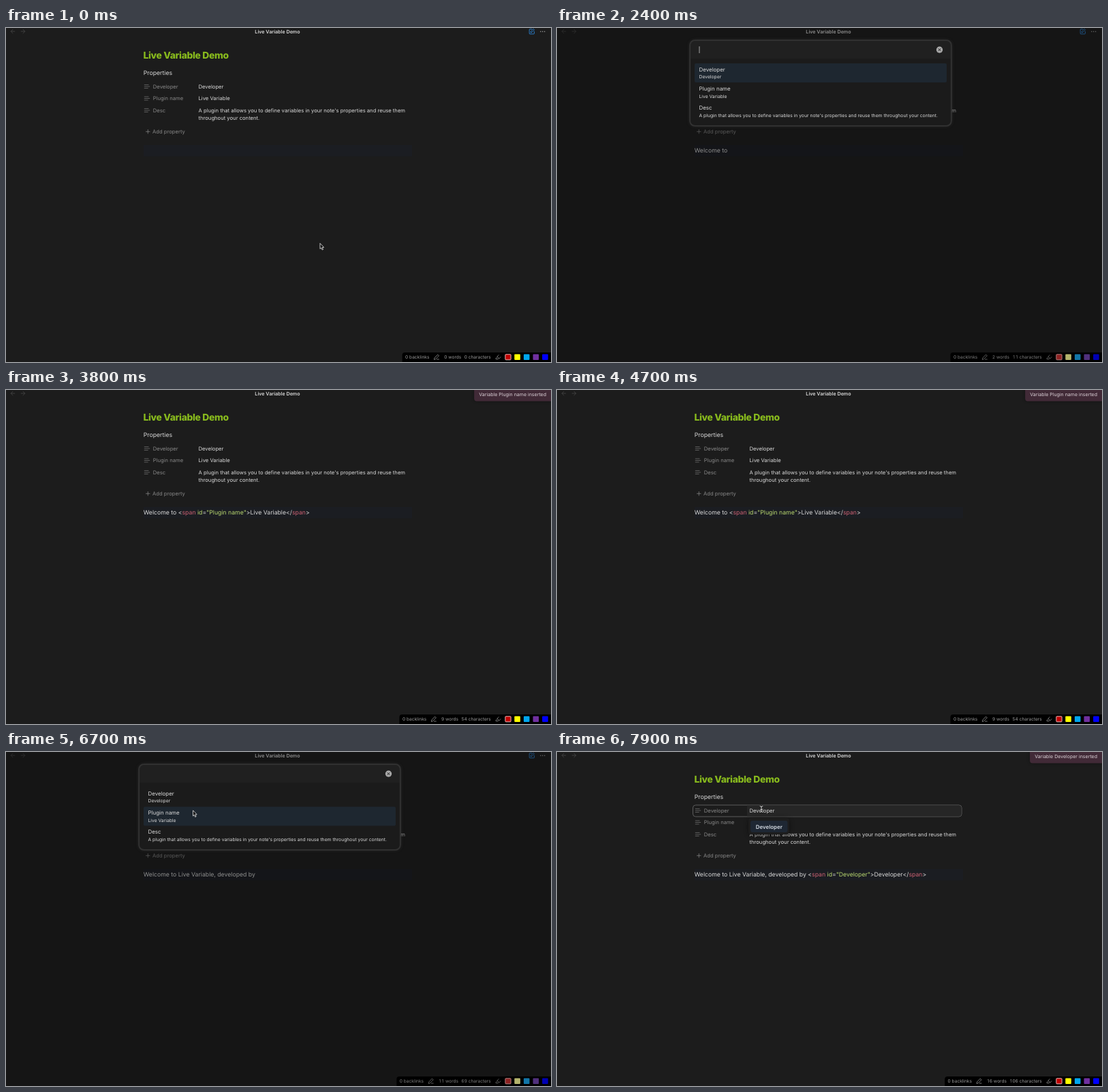
Animation, 800 px wide and 491 px high, one loop 8 s. Source, as an HTML page with a canvas:

```html
<!DOCTYPE html>
<html lang="en">
<head>
<meta charset="utf-8">
<title>Live Variable Demo</title>
<style>
html, body { margin: 0; width: 100%; height: 100%; overflow: hidden; background: #1c1c1c; }
canvas { display: block; width: 800px; height: 491px; }
</style>
</head>
<body>
<canvas id="stage" width="800" height="491"></canvas>
<script>
const ctx = document.getElementById('stage').getContext('2d');
const LOOP = 8000, STEP = 100;
const BG = '#1c1c1c', LIGHT = '#d8d8d8', MUTED = '#878787', TAG = '#cc6173', ATTR = '#b9d870';
const DESC = ["A plugin that allows you to define variables in your note's properties and reuse them",
  'throughout your content.'];
const PROPS = [['Developer', 'Developer'], ['Plugin name', 'Live Variable'], ['Desc', DESC.join(' ')]];
const INTRO = 'Welcome to ', CREDIT = ', developed by ';

// Step numbers (tenths of a second) of the hard changes
const AT = { open1: 24, insert1: 33, type2: 48, notice1End: 61, open2: 64, insert2: 73, focus: 78 };

// Glyphs are laid out at 14px and scaled, so that advances stay fractional.
function setFont(weight, spacing = 0) {
  ctx.font = `${weight} 14px Inter, sans-serif`;
  ctx.textRendering = 'geometricPrecision';
  ctx.letterSpacing = spacing + 'px';
}

// Draws text with its capitals centred on y; returns the width.
function text(str, x, y, size, color, { weight = 400, align = 'left', spacing = 0 } = {}) {
  const k = size / 14;
  ctx.save();
  setFont(weight, spacing);
  const width = ctx.measureText(str).width * k;
  ctx.translate(align === 'right' ? x - width : align === 'center' ? x - width / 2 : x, y + size * 0.364);
  ctx.scale(k, k);
  ctx.fillStyle = color;
  ctx.fillText(str, 0, 0);
  ctx.restore();
  return width;
}

function textWidth(str, size, weight = 400) {
  ctx.save();
  setFont(weight);
  const width = ctx.measureText(str).width * size / 14;
  ctx.restore();
  return width;
}

// Right-aligned text whose digits all take the width of a zero; returns its left edge.
function tabularText(str, right, y, size, color) {
  const cell = textWidth('0', size);
  let x = right;
  for (const run of str.match(/\d|\D+/g).reverse()) {
    const isDigit = /\d/.test(run);
    x -= isDigit ? cell : textWidth(run, size);
    if (isDigit) text(run, x + cell / 2, y, size, color, { align: 'center' });
    else text(run, x, y, size, color);
  }
  return x;
}

function box(x, y, w, h, radius, fill, stroke, lineWidth = 1) {
  ctx.beginPath();
  ctx.roundRect(x, y, w, h, radius);
  if (fill) { ctx.fillStyle = fill; ctx.fill(); }
  if (stroke) { ctx.strokeStyle = stroke; ctx.lineWidth = lineWidth; ctx.stroke(); }
}

function icon(path, x, y, scale, color, width = 1.9) {
  ctx.save();
  ctx.translate(x, y);
  ctx.scale(scale, scale);
  ctx.translate(-12, -12);
  ctx.strokeStyle = color;
  ctx.lineWidth = width;
  ctx.lineCap = ctx.lineJoin = 'round';
  ctx.stroke(new Path2D(path));
  ctx.restore();
}

const ICONS = {
  back: 'M12 19l-7-7 7-7M19 12H5',
  next: 'M5 12h14M12 5l7 7-7 7',
  lines: 'M3 6H17M3 12H21M3 18H15',
  plus: 'M5 12H19M12 5V19',
  edit: 'M12 3H5a2 2 0 0 0-2 2v14a2 2 0 0 0 2 2h14a2 2 0 0 0 2-2v-7M18.4 2.6l3 3L12 15l-4 1 1-4z',
  pen: 'M17 3l4 4L7 21l-5 1 1-5zM13 21h8',
  marker: 'M9 11l-6 6v3h9l3-3M22 12l-4.6 4.6a2 2 0 0 1-2.8 0l-5.2-5.2a2 2 0 0 1 0-2.8L14 4'
};

const typedIntro = k => k < 9 ? 0 : Math.min(11, k - 8 + (k >= 15));

function typedCredit(k) {
  if (k < AT.type2) return 0;
  return k < 56 ? k - 47 : [8, 9, 10, 10, 11, 13, 15][Math.min(6, k - 56)];
}

const span = (id, value) => [['<', LIGHT], ['span', TAG], [' id', ATTR], ['=', LIGHT], [`"${id}"`, ATTR],
  ['>', LIGHT], [value, LIGHT], ['</', LIGHT], ['span', TAG], ['>', LIGHT]];
const spanPlugin = span('Plugin name', 'Live Variable');
const spanDeveloper = span('Developer', 'Developer');
const plain = parts => parts.map(p => p[0]).join('');

// Coloured runs of the edited line
function lineParts(k) {
  const intro = INTRO.slice(0, typedIntro(k));
  if (k < AT.insert1) return [[intro, LIGHT]];
  if (k < AT.type2) return [[intro, LIGHT], ...spanPlugin];
  const parts = [[intro + 'Live Variable' + CREDIT.slice(0, typedCredit(k)), LIGHT]];
  return k < AT.insert2 ? parts : [...parts, ...spanDeveloper];
}

// Markdown source behind the line, as counted in the status bar
function source(k) {
  return INTRO.slice(0, typedIntro(k)) + (k >= AT.insert1 ? plain(spanPlugin) : '') +
    CREDIT.slice(0, typedCredit(k)) + (k >= AT.insert2 ? plain(spanDeveloper) : '');
}

const blinkOn = k => Math.floor(k / 5) % 2 === 0;
const modalOpen = k => (k >= AT.open1 && k < AT.insert1) || (k >= AT.open2 && k < AT.insert2);

function drawHeader() {
  icon(ICONS.back, 10, 5, 0.4, '#484848');
  icon(ICONS.next, 25, 5, 0.4, '#484848');
  text('Live Variable Demo', 398.5, 5, 7.15, LIGHT, { weight: 600, align: 'center' });
  icon(ICONS.edit, 771.8, 5.2, 0.4, '#2b86d9', 2.2);
  ctx.fillStyle = '#a0a0a0';
  for (let i = 0; i < 3; i++) {
    ctx.beginPath();
    ctx.arc(784.8 + i * 2.9, 5.2, 0.75, 0, 7);
    ctx.fill();
  }
}

function drawProperties(k) {
  text('Live Variable Demo', 201.5, 40, 13.9, '#88ba1d', { weight: 800, spacing: -0.35 });
  text('Properties', 201.7, 66, 8.72, LIGHT);
  const focused = k >= AT.focus;
  if (focused) {
    box(199.5, 78, 394.5, 17, 4, null, '#5c5c5c');
    box(279, 78.5, 314.5, 16, [0, 3.5, 3.5, 0], '#262626');
  }
  PROPS.forEach(([name, value], i) => {
    const y = 86 + i * 17.5;
    icon(ICONS.lines, 207, y, 0.42, '#6c6c6c');
    text(name, 215.8, y, 7.65, MUTED);
    if (i < 2) text(value, 282.5, y, 7.65, LIGHT);
    else DESC.forEach((line, n) => text(line, 282.5, y + n * 11.6, 7.65, LIGHT));
  });
  icon(ICONS.plus, 208.3, 152.3, 0.4, MUTED);
  text('Add property', 215, 152, 7.65, MUTED);
  if (focused) drawSuggestion();
}

function drawSuggestion() {
  ctx.save();
  ctx.shadowColor = 'rgba(0,0,0,.45)';
  ctx.shadowBlur = 7;
  ctx.shadowOffsetY = 1;
  box(281, 97, 60, 24, 4, '#1d1d1d');
  ctx.restore();
  box(284, 101, 54.5, 17, 3, '#1e2733');
  text('Developer', 311.3, 109.8, 7.9, '#d3dae2', { weight: 600, align: 'center' });
}

function drawLine(k) {
  box(202, 172, 394, 16.5, 0, '#1b1d22');
  let x = 201.7;
  for (const [str, color] of lineParts(k)) x += text(str, x, 180, 8.7, color);
  const typing = (k >= 9 && k < 20) || (k >= AT.type2 && k < 63);
  if (!modalOpen(k) && k >= 6 && k < AT.focus && (typing || blinkOn(k))) {
    ctx.fillStyle = '#c4c4c4';
    ctx.fillRect(x + 0.1, 174.8, 0.7, 10.6);
  }
}

const SWATCHES = {
  bright: ['#c00000', '#ffff00', '#00a6ee', '#7030a0', '#0000ff'],
  dimmed: ['#8e2222', '#b4b46c', '#1276a8', '#50307c', '#0000b4']
};

function drawStatus(k, dim) {
  const raw = source(k - 1), size = 6.58, y = 483.7, gray = dim ? '#7e7e7e' : '#9a9a9a';
  const iconColor = dim ? '#828282' : '#a8a8a8';
  const count = (raw.match(/\w+/g) || []).length;
  const chars = `${raw.length} characters`;
  const words = `${count} word${count === 1 ? '' : 's'}`;
  ctx.fillStyle = '#000';
  ctx.fillRect(700, 477, 100, 14);
  // Measured once off the bar, so that the panel lies behind its text
  const cell = textWidth('0', size);
  const width = str => textWidth(str.replace(/\d/g, ''), size) + str.replace(/\D/g, '').length * cell;
  const left = 711.8 - width(chars) - 4.4 - width(words) - 21.8 - width('0 backlinks') - 4.4;
  box(left, 477, 800 - left, 14, [4, 0, 0, 0], '#000');
  const charsX = tabularText(chars, 711.8, y, size, gray);
  const wordsX = tabularText(words, charsX - 4.4, y, size, gray);
  tabularText('0 backlinks', wordsX - 21.8, y, size, gray);
  icon(ICONS.pen, wordsX - 11, y, 0.37, iconColor);
  icon(ICONS.marker, 722.4, y, 0.37, iconColor);
  SWATCHES[dim ? 'dimmed' : 'bright'].forEach((color, i) => {
    box(732.7 + i * 13.6, 479.6, 8.6, 8.4, 1, color);
    if (!i) box(732.9, 479.8, 8.2, 8, 1, null, dim ? '#a88686' : '#e2cccc', 0.9);
  });
}

function drawNotice(k) {
  const name = k >= AT.insert2 ? 'Developer' : k >= AT.insert1 && k < AT.notice1End ? 'Plugin name' : '';
  if (!name) return;
  const label = `Variable ${name} inserted`;
  const x = 793 - textWidth(label, 7.02);
  ctx.save();
  ctx.shadowColor = 'rgba(0,0,0,.4)';
  ctx.shadowBlur = 4;
  box(x - 7.2, -6, 830 - x, 22.5, 4, '#412a37');
  ctx.restore();
  text(label, x, 6.8, 7.02, '#dcd2d8');
}

function drawModal(k, mouse) {
  ctx.save();
  ctx.shadowColor = 'rgba(75,75,75,.6)';
  ctx.shadowBlur = 5;
  box(195.5, 18.5, 383, 125, 7, '#1b1b1b');
  ctx.restore();
  box(196, 19, 382, 26, [6, 6, 0, 0], '#202020');
  box(195.2, 18.2, 383.6, 125.6, 7, null, '#323232', 1.8);

  ctx.fillStyle = '#a9a9a9';
  ctx.beginPath();
  ctx.arc(561.5, 32, 4.7, 0, 7);
  ctx.fill();
  icon('M6 6L18 18M18 6L6 18', 561.5, 32, 0.27, '#202020', 3.6);
  if (blinkOn(k)) {
    ctx.fillStyle = '#c8c8c8';
    ctx.fillRect(208.6, 27, 0.8, 10);
  }

  const hovered = mouse && mouse.y >= 80 && mouse.y < 108 ? 1 : 0;
  box(202, 52 + hovered * 28.4, 370, 28, 2, '#1e2730');
  PROPS.forEach(([name, value], i) => {
    text(name, 208.5, 60.7 + i * 28.4, 7.95, LIGHT);
    text(value, 208.5, 71.8 + i * 28.4, 6.78, LIGHT);
  });
}

const PATH = [[0, 461, 316.5], [24, 461, 316.5], [29, 278, 97.5], [66, 278, 97.5],
  [70, 256, 23], [72, 257, 62], [74, 258, 66], [77, 300, 84]];

function mouseAt(k) {
  if (!(k < 9 || (k >= 25 && k < 34) || k >= 66)) return null;
  const i = PATH.findIndex(p => p[0] > k);
  if (i < 0) return { x: 300, y: 84 };
  const [k0, x0, y0] = PATH[i - 1], [k1, x1, y1] = PATH[i];
  const u = (k - k0) / (k1 - k0), e = u * u * (3 - 2 * u);
  return { x: x0 + (x1 - x0) * e, y: y0 + (y1 - y0) * e };
}

function drawMouse(k, { x, y }) {
  const beam = k >= 66 && (modalOpen(k) ? y < 46 : y > 70);
  ctx.save();
  ctx.translate(x, y);
  ctx.lineJoin = 'round';
  if (beam) {
    const shape = new Path2D('M-2.3-4.5Q0-4.5 0-3V3Q0 4.5-2.3 4.5M2.3-4.5Q0-4.5 0-3M0 3Q0 4.5 2.3 4.5M-1.3 .7H1.3');
    ctx.strokeStyle = '#111';
    ctx.lineWidth = 2.4;
    ctx.stroke(shape);
    ctx.strokeStyle = '#e4e4e4';
    ctx.lineWidth = 1;
    ctx.stroke(shape);
  } else {
    const arrow = new Path2D('M0 0V8.2L1.8 6.5 3.1 9.6 4.5 9 3.2 6H5.6Z');
    ctx.fillStyle = '#000';
    ctx.fill(arrow);
    ctx.strokeStyle = '#e8e8e8';
    ctx.lineWidth = 0.85;
    ctx.stroke(arrow);
  }
  ctx.restore();
}

function draw(k) {
  const mouse = mouseAt(k), modal = modalOpen(k);
  ctx.fillStyle = BG;
  ctx.fillRect(0, 0, 800, 491);
  drawHeader();
  drawProperties(k);
  drawLine(k);
  if (modal) {
    ctx.fillStyle = 'rgba(10,10,10,.37)';
    ctx.fillRect(0, 0, 800, 491);
    drawModal(k, mouse);
  }
  drawStatus(k, modal);
  drawNotice(k);
  if (mouse) drawMouse(k, mouse);
}

let start;
function tick(now) {
  start ??= now;
  draw(Math.floor((now - start) % LOOP / STEP));
  requestAnimationFrame(tick);
}
draw(0);
requestAnimationFrame(tick);
</script>
</body>
</html>
```
